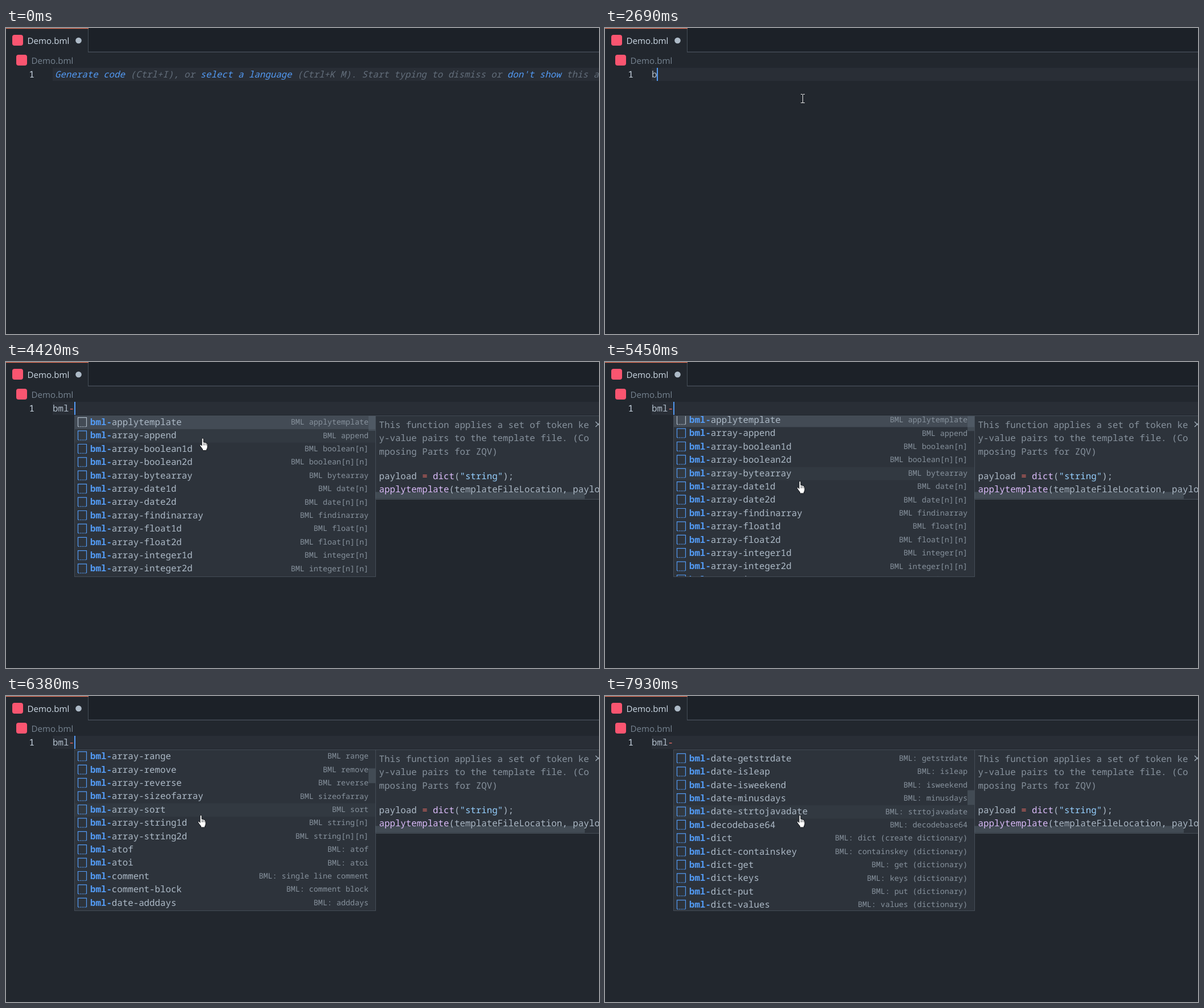
Animation of 1042x538 px, one loop 8 s. Source, as an HTML page with a canvas:

```html
<!DOCTYPE html>
<html lang="en">
<head>
<meta charset="utf-8">
<title>Snippet completion</title>
<style>
  html, body { margin: 0; height: 100%; overflow: hidden; background: #22272e; }
  canvas { display: block; }
</style>
</head>
<body>
<canvas id="stage" width="1042" height="538"></canvas>
<script>
const ctx = document.getElementById('stage').getContext('2d');
ctx.textRendering = 'geometricPrecision';

const LOOP = 8000, W = 1042, H = 538;
const SIZE = 15.77, CHAR = SIZE * 0.6, ROW = 23.4;
const CODE_X = 82, BASELINE = 87;
const LIST_TOP = 95, LIST_HEIGHT = 282, LIST_WIDTH = 530, TOTAL_ROWS = 131;
const C = {
  bg: '#22272e', bar: '#1c2128', line: '#292e36', border: '#444c56', popup: '#2d333b',
  text: '#adbac7', bright: '#cdd9e5', muted: '#768390', ghost: '#636e7b', detail: '#87929d',
  blue: '#539bf5', red: '#f47067', purple: '#dcbdfb', string: '#96d0ff', icon: '#fa5570',
  selected: '#434b55', hover: '#323941', thumb: 'rgba(99,110,123,.4)'
};

// Each entry is name or name|detail; the detail defaults to the last part of the name.
const entries = `applytemplate array-append array-boolean1d array-boolean2d array-bytearray
  array-date1d array-date2d array-findinarray array-float1d array-float2d array-integer1d
  array-integer2d array-isempty array-max array-min array-range array-remove array-reverse
  array-sizeofarray array-sort array-string1d array-string2d atof atoi
  comment|single_line_comment comment-block|comment_block date-adddays date-addmonths
  date-comparedates date-datetostr date-getcurrenttimeinmillis|getcurrenttimein… date-getdate
  date-getdiffindays date-getstrdate date-isleap date-isweekend date-minusdays
  date-strtojavadate decodebase64 dict|dict_(create_dictionary) dict-containskey dict-get
  dict-keys dict-put dict-values`.split(/\s+/).map((entry, i) => {
  const [name, custom] = entry.split('|');
  let detail = custom ? custom.replace(/_/g, ' ') : name.split('-').pop();
  if (name.startsWith('array-')) detail = detail.replace('1d', '[n]').replace('2d', '[n][n]');
  if (name.startsWith('dict-')) detail += ' (dictionary)';
  return { label: 'bml-' + name, detail: (i < 22 ? 'BML ' : 'BML: ') + detail };
});

const keystrokes = [[1670, ''], [2630, 'b'], [2780, 'bm'], [2950, 'bml'], [3830, 'bml-']];
const scrolls = [[5415, 5835], [6090, 6490], [6920, 7180], [7450, 7973]];
const SCROLL_STEP = 193;
const hand = new Path2D('M4 2Q4 .5 5.5 .5Q7 .5 7 2V7.5Q13 8 14 11V16Q14 18 12.5 20V22H5.5V20' +
  'L1 14Q0 12 1.5 11.5Q3 11.5 4 13.5Z');

const smooth = p => (p = Math.min(1, Math.max(0, p)), p * p * (3 - 2 * p));
const progress = (t, from, to) => smooth((t - from) / (to - from));

function rect(x, y, w, h, color) {
  ctx.fillStyle = color;
  ctx.fillRect(x, y, w, h);
}

function text(str, x, y, color, { size = SIZE, style = '', family = '"Noto Sans Mono", monospace', align = 'left' } = {}) {
  ctx.font = `${style} ${size}px ${family}`;
  ctx.textAlign = align;
  ctx.fillStyle = color;
  ctx.fillText(str, x, y);
}

// Draws [text, color] pairs one after another on the character grid.
function runs(parts, x, y, opts) {
  for (const [str, color] of parts) {
    text(str, x, y, color, opts);
    x += str.length * CHAR;
  }
}

function fileName(x, y, color) {
  ctx.fillStyle = C.icon;
  ctx.beginPath();
  ctx.roundRect(x, y, 19, 19, 4);
  ctx.fill();
  text('Demo.bml', x + 26.5, y + 16, color, { size: 15.1, family: '"Open Sans", sans-serif' });
}

function drawChrome() {
  rect(0, 0, W, H, C.bg);
  rect(145, 0, W, 42, C.bar);
  rect(144, 41.5, W, 1.5, C.border);
  rect(144, 0, 1, 43, C.border);
  rect(0, 0, 145, 1.2, '#ec775c');
  fileName(11, 12, C.bright);
  fileName(18, 47, C.muted);
  ctx.fillStyle = C.text;
  ctx.beginPath();
  ctx.arc(127.5, 22, 5.3, 0, 7);
  ctx.fill();
  rect(CODE_X, 70, W, 23, C.line);
  text('1', 40.5, BASELINE, C.bright);
}

function caretOpacity(age) {
  if (age < 500) return 1;
  const phase = (age - 500) / 500;
  const part = Math.floor(phase) % 2 ? 1 - phase % 1 : phase % 1;
  return 1 - smooth((part - 0.2) / 0.4);
}

function drawCode(t, typed, since) {
  if (typed) {
    runs([[typed.slice(0, 3), C.text], [typed.slice(3), C.red]], CODE_X, BASELINE);
  } else {
    runs([['Generate code', C.blue], [' (Ctrl+I), or ', C.ghost], ['select a language', C.blue],
      [' (Ctrl+K M). Start typing to dismiss or ', C.ghost], ["don't show", C.blue],
      [' this again.', C.ghost]], 86, BASELINE, { style: 'italic' });
  }
  if (since === undefined) return;
  ctx.globalAlpha = caretOpacity(t - since);
  rect(Math.round(CODE_X + typed.length * CHAR), 70, 2, 23, C.blue);
  ctx.globalAlpha = 1;
}

function snippetIcon(x, y, color) {
  ctx.strokeStyle = color;
  ctx.lineWidth = 1.2;
  ctx.beginPath();
  ctx.moveTo(x, y + 16);
  ctx.lineTo(x, y);
  ctx.lineTo(x + 15, y);
  ctx.lineTo(x + 15, y + 16);
  ctx.stroke();
  for (let i = 0; i < 5; i++) rect(x + 0.5 + i * 3, y + 15.4, 1.7, 1.2, color);
}

function panel(x, y, w, h) {
  rect(x, y, w, h, C.border);
  rect(x + 1, y + 1, w - 2, h - 2, C.popup);
}

function drawList(x, matched, scroll, pointerY) {
  panel(x, LIST_TOP - 1, LIST_WIDTH, LIST_HEIGHT + 2);
  ctx.save();
  ctx.beginPath();
  ctx.rect(x + 1, LIST_TOP, LIST_WIDTH - 2, LIST_HEIGHT);
  ctx.clip();
  const hovered = Math.floor((pointerY - 4 - LIST_TOP + scroll) / ROW);
  entries.forEach(({ label, detail }, i) => {
    const y = LIST_TOP + i * ROW - scroll;
    if (y < LIST_TOP - ROW || y > LIST_TOP + LIST_HEIGHT) return;
    if (i === 0) rect(x, y, LIST_WIDTH, ROW, C.selected);
    else if (i === hovered) rect(x, y, LIST_WIDTH, ROW, C.hover);
    snippetIcon(x + 6.5, y + 2.7, i ? C.blue : C.text);
    text(label.slice(0, matched), x + 28, y + 16, C.blue, { style: 'bold' });
    text(label.slice(matched), x + 28 + matched * CHAR, y + 16, C.text);
    text(detail, x + 517, y + 15.2, C.detail, { size: SIZE * 0.85, align: 'right' });
  });
  const ratio = LIST_HEIGHT / (TOTAL_ROWS * ROW);
  rect(x + 517, LIST_TOP + scroll * ratio, 12, LIST_HEIGHT * ratio, C.thumb);
  ctx.restore();
}

function drawDocs(x) {
  panel(x, 94, W, 148);
  rect(x, 228.5, 368, 12, C.thumb);
  ['This function applies a set of token ke', 'y-value pairs to the template file. (Co', 'mposing Parts for ZQV)']
    .forEach((line, i) => text(line, x + 6.5, 115.7 + i * ROW, C.detail));
  runs([['payload ', C.text], ['=', C.red], [' ', C.text], ['dict', C.purple], ['(', C.text],
    ['"string"', C.string], [');', C.text]], x + 6.5, 205.5);
  runs([['applytemplate', C.purple], ['(templateFileLocation, payload);', C.text]], x + 6.5, 229);
  ctx.strokeStyle = C.text;
  ctx.lineWidth = 1.2;
  ctx.beginPath();
  ctx.moveTo(x + 387, 105);
  ctx.lineTo(x + 396, 114);
  ctx.moveTo(x + 396, 105);
  ctx.lineTo(x + 387, 114);
  ctx.stroke();
}

function pointerAt(t) {
  const enter = progress(t, 330, 630), approach = progress(t, 1230, 1420), down = progress(t, 4250, 5030);
  return {
    x: 508.5 - 108 * enter - 54 * approach - 3.5 * down,
    y: 360 - 191 * enter - 45 * approach + 86 * down
  };
}

function drawPointer({ x, y }, isHand) {
  ctx.save();
  if (isHand) {
    ctx.translate(x - 6, y - 1);
    ctx.fillStyle = '#fff';
    ctx.strokeStyle = '#15181c';
    ctx.lineWidth = 1;
    ctx.fill(hand);
    ctx.stroke(hand);
    for (const fx of [7, 9.5, 12]) rect(fx, 9, 0.7, 4, '#15181c');
  } else {
    ctx.translate(Math.round(x), Math.round(y));
    rect(0, -7, 1, 15, '#e6e6e6');
    for (const sy of [-8, 7]) {
      rect(-3, sy, 3, 1, '#e6e6e6');
      rect(1, sy, 3, 1, '#e6e6e6');
    }
  }
  ctx.restore();
}

function draw(t) {
  const [since, typed] = keystrokes.filter(([at]) => at <= t).pop() || [undefined, ''];
  const pointer = pointerAt(t);
  const listOpen = t >= 3010 && t < 3830 || t >= 3970;
  const docsOpen = t >= 3080 && t < 3830 || t >= 4100;
  const listX = typed.length > 3 ? 120 : 110;
  const scroll = scrolls.reduce((sum, [from, to]) => sum + SCROLL_STEP * progress(t, from, to), 0);

  drawChrome();
  drawCode(t, typed, since);
  if (listOpen) drawList(listX, typed.length, scroll, pointer.y);
  if (docsOpen) drawDocs(listX + LIST_WIDTH - 1);
  if (t >= 1620 && t < 1830) {
    ctx.fillStyle = 'rgba(255,255,0,.47)';
    ctx.beginPath();
    ctx.arc(344, 123, 15, 0, 7);
    ctx.fill();
  }
  if (t >= 330) drawPointer(pointer, listOpen);
}

const start = performance.now();
function tick() {
  draw((performance.now() - start) % LOOP);
  requestAnimationFrame(tick);
}
tick();
</script>
</body>
</html>
```
